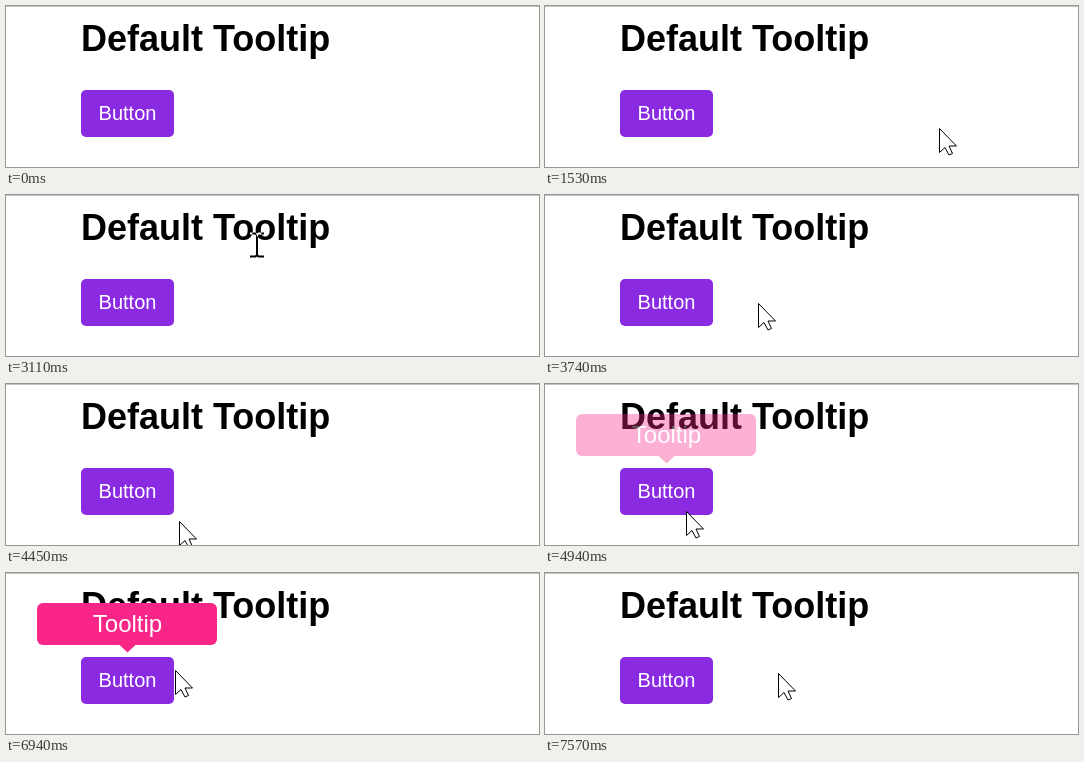
These frames come from a looping animation (533 by 161 pixels, 8 s). An HTML page:

```html
<!DOCTYPE html>
<html lang="en">
<head>
<meta charset="utf-8">
<title>Default Tooltip</title>
<style>
  html, body { margin: 0; width: 100%; height: 100%; overflow: hidden; background: #fff; }
  svg { display: block; }
  text { font-family: "Liberation Sans", Arial, sans-serif; }
  .label { fill: #fff; text-anchor: middle; }
  #beam { fill: none; stroke: #fff; stroke-width: 2; mix-blend-mode: difference; }
</style>
</head>
<body>
<svg width="533" height="161" viewBox="0 0 533 161">
  <rect width="533" height="161" fill="#fff"/>
  <rect width="533" height="1" fill="#c4c4c4"/>
  <text x="75" y="45" font-size="36" font-weight="bold">Default Tooltip</text>
  <rect x="75" y="84" width="93" height="47" rx="5" fill="#8a2be2"/>
  <text class="label" x="121.5" y="114" font-size="20">Button</text>
  <g id="tip">
    <path d="M113 71.5h17l-8.5 8z" fill="#f92587"/>
    <rect x="31" y="30" width="180" height="42" rx="6" fill="#f92587"/>
    <text class="label" x="121.5" y="59" font-size="24">Tooltip</text>
  </g>
  <path id="beam" d="M-7-11.5h5.5l1.5 1.5 1.5-1.5h5.5M0-10v20M-7 11.5h5.5l1.5-1.5 1.5 1.5h5.5"/>
  <path id="arrow" d="M.5.5v24l5.5-5 4 7.5 3.5-1.5-3.5-7.5h7.5z" fill="#fff" stroke="#000"/>
</svg>
<script>
const LOOP = 8000, ENTER = 4850, LEAVE = 6940, FADE = 400, TEXT_BOTTOM = 54;

// Pointer path: time, x, y
const path = [
  [1320, 439, 148], [2090, 280, 57], [2300, 262, 46], [2580, 253, 46],
  [2980, 253, 46], [3740, 213, 108], [4590, 165, 140], [4940, 141, 127],
  [5420, 127, 110], [6610, 127, 110], [6940, 169, 97], [7360, 223, 96],
  [7570, 233, 100], [LOOP, 233, 100]
];
const [tip, beam, arrow] = ["tip", "beam", "arrow"].map(id => document.getElementById(id));

const clamp = v => Math.min(1, Math.max(0, v));

// CSS "ease": cubic-bezier(.25, .1, .25, 1)
function ease(p) {
  const bezier = (a, b, s) => 3 * a * s * (1 - s) ** 2 + 3 * b * s * s * (1 - s) + s ** 3;
  let low = 0, high = 1;
  for (let i = 0; i < 20; i++) {
    const mid = (low + high) / 2;
    if (bezier(.25, .25, mid) < p) low = mid; else high = mid;
  }
  return bezier(.1, 1, low);
}

// Speed at a path point, zero where the pointer rests
function speed(i, axis) {
  const a = path[Math.max(0, i - 1)], b = path[i], c = path[Math.min(path.length - 1, i + 1)];
  const rests = (p, q) => p !== q && p[1] === q[1] && p[2] === q[2];
  return rests(a, b) || rests(b, c) ? 0 : (c[axis] - a[axis]) / (c[0] - a[0]);
}

function pointer(t, axis) {
  let i = 0;
  while (i < path.length - 2 && t >= path[i + 1][0]) i++;
  const a = path[i], b = path[i + 1], span = b[0] - a[0], s = (t - a[0]) / span, r = 1 - s;
  return Math.round(
    r * r * (1 + 2 * s) * a[axis] + s * s * (3 - 2 * s) * b[axis] +
    span * s * r * (r * speed(i, axis) - s * speed(i + 1, axis)));
}

function draw(now) {
  const t = now % LOOP;
  tip.style.opacity = ease(clamp((t - ENTER) / FADE)) - ease(clamp((t - LEAVE) / FADE));
  const shown = t >= path[0][0];
  const x = pointer(Math.max(t, path[0][0]), 1), y = pointer(Math.max(t, path[0][0]), 2);
  const overText = y < TEXT_BOTTOM;
  for (const [cursor, on] of [[beam, overText], [arrow, !overText]]) {
    cursor.setAttribute("transform", `translate(${x} ${y})`);
    cursor.style.display = shown && on ? "" : "none";
  }
}

const start = performance.now();
function tick() {
  draw(performance.now() - start);
  requestAnimationFrame(tick);
}
tick();
</script>
</body>
</html>
```
